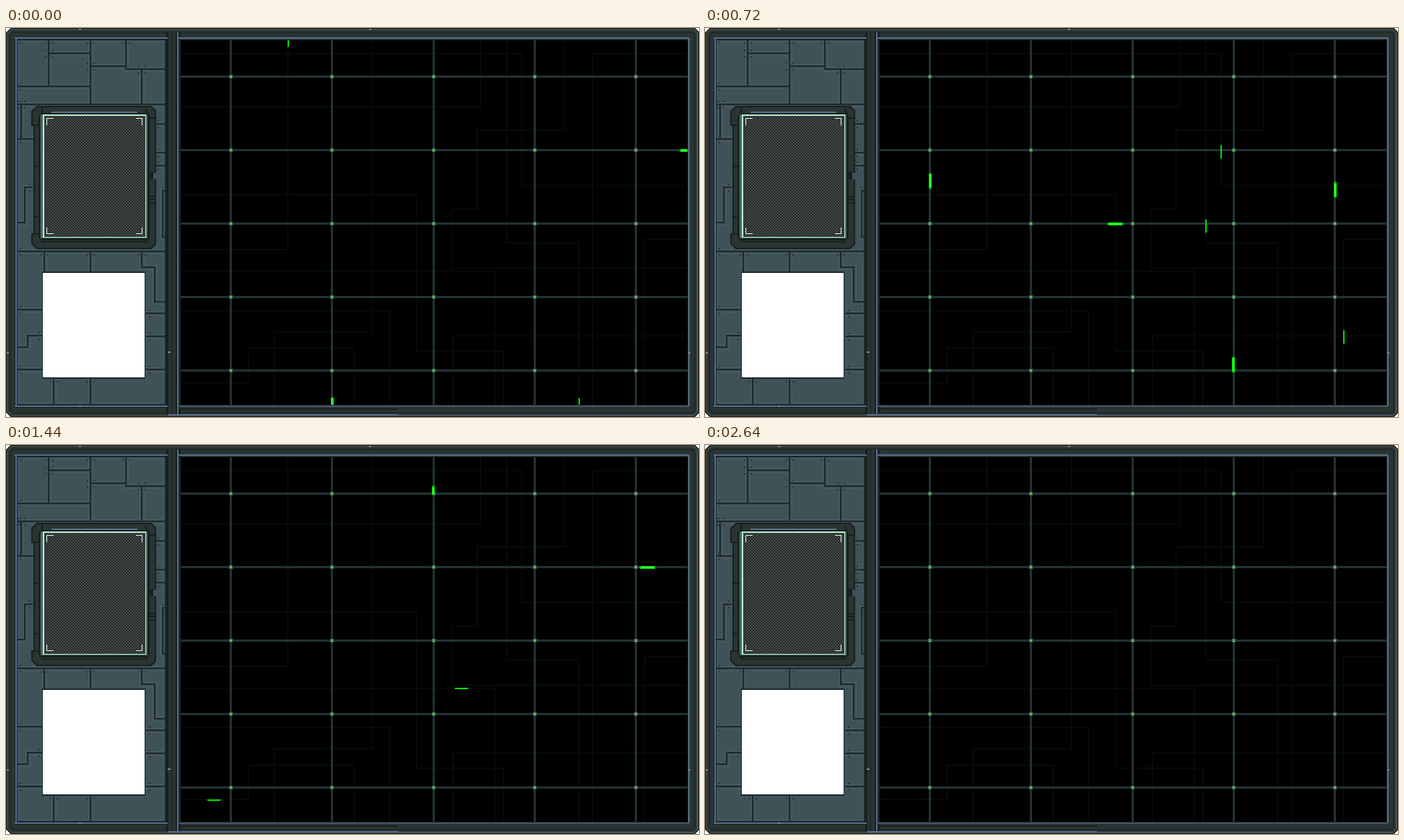
Animation of 960 by 540 pixels, one loop 2680 ms. Source, as an HTML page:

```html
<!DOCTYPE html>
<html lang="en">
<head>
<meta charset="utf-8">
<title>Circuit panel</title>
<style>
html, body { margin: 0; width: 100%; height: 100%; overflow: hidden; background: #fff; }
svg { display: block; width: 960px; height: 540px; }
</style>
</head>
<body>
<svg viewBox="0 0 960 540" shape-rendering="crispEdges">
  <defs>
    <pattern id="mesh" width="4" height="4" patternUnits="userSpaceOnUse">
      <path fill="#474d4b" d="M0 0h2v2h-2zM2 2h2v2h-2z"/>
    </pattern>
    <clipPath id="wall"><path d="M15 16H222V524H15z"/></clipPath>
    <clipPath id="screen"><path d="M242 17H944V523H242z"/></clipPath>
  </defs>
  <g id="case"></g>
  <g id="plates" clip-path="url(#wall)"></g>
  <g id="device"></g>
  <g id="board"></g>
  <g id="pulses" clip-path="url(#screen)"></g>
</svg>
<script>
const $ = id => document.getElementById(id);
const box = (x, y, w, h, fill) => `<rect x="${x}" y="${y}" width="${w}" height="${h}" fill="${fill}"/>`;
const line = (d, color, w = 1) => `<path d="${d}" fill="none" stroke="${color}" stroke-width="${w}"/>`;
const area = (d, fill) => `<path d="${d}" fill="${fill}"/>`;

const dark = '#17201f', metal = '#2a3533', slate = '#3e5257', blue = '#596c8c';

// Rectangle with cut corners, inset by i
const plate = (i, cut) =>
  `M${i + cut} ${i}H${960 - i - cut}L${960 - i} ${i + cut}V${540 - i - cut}` +
  `L${960 - i - cut} ${540 - i}H${i + cut}L${i} ${540 - i - cut}V${i + cut}z`;

function drawCase() {
  $('case').innerHTML =
    area(plate(0, 6), dark) + area(plate(1, 6), '#3d4845') + area(plate(3, 5), metal) +
    line(plate(6, 4), '#202a29', 2) +
    box(12, 13, 212, 514, dark) +
    box(222, 6, 20, 531, dark) + box(225, 6, 4, 531, metal) + box(230, 6, 5, 531, metal) +
    line('M237.5 6V537M13.5 14V526M12 14H224M12 525H224M238 14H946M945.5 14V525M224 537H543', blue, 2) +
    line('M238 525H946', '#465668', 2) +
    line('M240 528.5H543', dark, 2) +
    line('M543 537.5H952M957.5 8V532', '#51627b') +
    line('M101 2H104M503 2H506M101 524.5H104M1 450.5H4M945 450.5H948M224 450H228', '#7d8a88', 2);
}

// Wall: one path of seams; bevels are wider strokes under it, bolts sit beside its ends
const seams = 'M15 16H221V523H15V16M59 16V81M59 35H117M15 81H117M117 16V106M117 53H166M166 16V57H221' +
  'M188 57V106M15 106H221M21 106V154M15 154H38M206 133H221M206 173H221M206 191H221M37 221H26V270H15' +
  'M221 226H217V290H221M15 310H221M53 310V338M117 310V338M188 310V332H206V380H221M194 396H221' +
  'M194 428H221M194 474H221M15 391H50M50 427H30V443H15M15 474H50M66 486V523M117 486V523';
function drawPlates() {
  let bolts = '';
  for (const [, x, y] of seams.matchAll(/M(\d+) (\d+)/g))
    for (const dx of [-5, 4]) for (const dy of [-5, 4]) bolts += box(+x + dx, +y + dy, 2, 2, '#223033');
  $('plates').innerHTML = box(15, 16, 207, 508, slate) +
    line(seams, '#4a6064', 7) + line(seams, slate, 5) + bolts + line(seams, '#1d292b', 2);
}

function drawDevice() {
  const corners = (x, y, w, h, n) => `M${x} ${y + n}V${y}h${n}M${x + w - n} ${y}h${n}v${n}` +
    `M${x} ${y + h - n}v${n}h${n}M${x + w - n} ${y + h}h${n}v${-n}`;
  $('device').innerHTML =
    area('M42 108H201L208 115V201H203V210H208V300L201 307H42L35 300V285H38V136H35V115z', dark) +
    area('M43 110H200L206 116V200H195V210H206V299L200 305H43L37 299V287H40V136H37V116z', metal) +
    line('M50 110V119L46 123V290L51 297H194L198 290V122L193 112', dark, 2) +
    line('M37 135H46M38 192H48M38 262H46M37 286H48M195 125H206M195 234H206M195 238H206M195 243H206', dark, 2) +
    line('M63 116.5H182', blue, 2) +
    box(196, 201, 8, 9, dark) + box(48, 118, 149, 177, dark) +
    box(48, 120, 148, 172, '#4a6b66') + box(51, 120, 143, 171, '#b5efd0') +
    box(53, 122, 140, 168, '#232827') + box(53, 122, 140, 168, 'url(#mesh)') +
    line(corners(56.5, 125.5, 132, 160, 9), '#e6f5ee') +
    box(50, 338, 143, 149, '#1b282f') + box(51, 340, 141, 145, '#fff');
}

const traces = 'M390.5 17V307.5H241M507.5 17V421.5H371.5V523M657.5 17V109.5H241M241 35.5H714.5V218.5H944' +
  'M693.5 17V298.5H793.5V523M773.5 17V141.5H652.5V251.5H617.5V333.5H944M944 35.5H812.5V523' +
  'M241 231.5H568.5V448.5H689.5V523M241 337.5H677.5V523M241 392.5H531.5V523' +
  'M241 492.5H335.5V444.5H482.5V523M884.5 523V293.5H944M619.5 523V427.5H944';
function drawBoard() {
  let grid = '', nodes = '';
  for (let i = 0; i < 5; i++) {
    const x = Math.round(311 + i * 140.25) + .5, y = 67.5 + i * 102;
    grid += box(x - 1.5, 17, 3, 506, '#233233') + box(242, y - 1.5, 702, 3, '#233233');
    for (let j = 0; j < 5; j++) {
      const ny = 67.5 + j * 102;
      nodes += line(`M${x - 2} ${ny - 2}l4 4m0 -4l-4 4`, i === 4 ? '#a3b5ab' : '#6fd873', 1.2);
    }
  }
  $('board').innerHTML = box(239, 16, 706, 508, '#1b2526') + box(242, 17, 702, 506, '#000') +
    line(traces, '#0d1010') + grid + `<g shape-rendering="geometricPrecision">${nodes}</g>`;
}

// Layers of a pulse: length, width, colour
const bold = { vx: 29.2, vy: 29.75, layers: [[25, 2, '#067a06'], [21, 4, '#00c400'], [18, 4, '#00e800'], [18, 2, '#30ff30']] };
const fine = { vx: 22.9, vy: 23.4, layers: [[22, 1, '#075c07'], [18, 2, '#00e400']] };

// A pulse sets out at a step and follows its path. It turns one step after
// coming within reach of a corner and runs off the screen on its last leg.
const reach = 8;
function route(kind, step, path) {
  let [x, y] = path.match(/[\d.]+/g).map(Number);
  const legs = [...path.matchAll(/([HV])([\d.]+)/g)].map(([, axis, end]) => {
    const flat = axis === 'H', from = flat ? x : y, delta = end - from;
    const leg = { flat, from, cross: flat ? y : x, dir: Math.sign(delta), len: Math.abs(delta), v: flat ? kind.vx : kind.vy, step };
    step += Math.ceil((leg.len - reach) / leg.v) + 1;
    if (flat) x = +end; else y = +end;
    return leg;
  });
  return { legs, layers: kind.layers };
}
const routes = [
  route(bold, 0, 'M944 169.5H732V523'),
  route(bold, 0, 'M451.5 523V271.5H311.5V67.5H242'),
  route(bold, 4, 'M451.5 17V271.5H591.5V523'),
  route(bold, 9, 'M944 373.5H872.5V67.5H591.5V17'),
  route(bold, 34, 'M947 169.5H732V67.5H242'),
  route(fine, 0, 'M390.5 17V35.5H242'),
  route(fine, 0, 'M793.5 523V298.5H693.5V17'),
  route(fine, 5, 'M944 218.5H714.5V35.5H657.5V17'),
  route(fine, 14, 'M884.5 523V293.5H944'),
  route(fine, 19, 'M242 337.5H677.5V427.5H944'),
  route(fine, 34, 'M242 492.5H335.5V444.5H482.5V523')
];

function pulse({ legs, layers }, step) {
  const leg = legs.findLast(l => step >= l.step);
  if (!leg) return '';
  const { flat, from, cross, dir, len, v } = leg;
  const run = (step - leg.step) * v;
  const last = leg === legs[legs.length - 1];
  const turning = !last && run >= len - reach;
  const pos = turning ? len : run;
  return layers.map(([size, w, color]) => {
    const a = Math.max(0, pos - size / 2), b = Math.min(len, pos + size / 2);
    if (b <= a) return '';
    const start = from + (dir > 0 ? a : -b);
    return flat ? box(start, cross - w / 2, b - a, w, color) : box(cross - w / 2, start, w, b - a, color);
  }).join('');
}

let shown = -1;
function render(ms) {
  const step = Math.floor((ms % 2680) / 40);
  if (step === shown) return;
  shown = step;
  $('pulses').innerHTML = routes.map(r => pulse(r, step)).join('');
}

drawCase();
drawPlates();
drawDevice();
drawBoard();
render(0);
let origin;
function tick(now) {
  origin ??= now;
  render(now - origin);
  requestAnimationFrame(tick);
}
requestAnimationFrame(tick);
</script>
</body>
</html>
```
